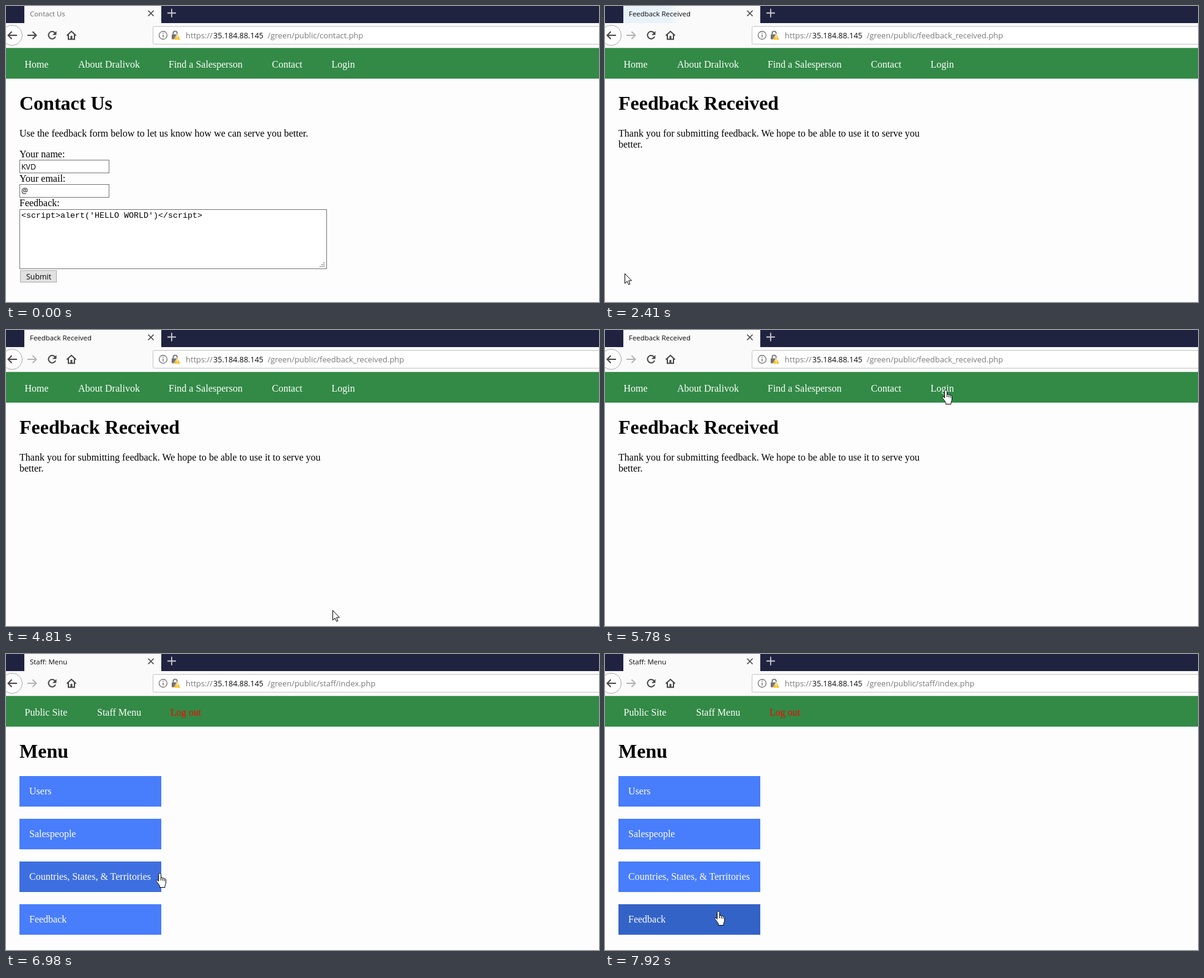
An HTML page for the animation above (8000 ms loop, 970 by 485 pixels).

```html
<!DOCTYPE html>
<html lang="en">
<head>
<meta charset="utf-8">
<title>Feedback form</title>
<style>
html, body { margin: 0; width: 100%; height: 100%; overflow: hidden; background: #fdfdfd; }
svg { display: block; }
text { white-space: pre; }
.serif { font: 16px "Liberation Serif", serif; }
.h1 { font: bold 32px "Liberation Serif", serif; }
.tab { font: 11.45px "Open Sans", sans-serif; }
.url { font: 12.9px "Open Sans", sans-serif; fill: #7b7b7b; }
.ip { font-size: 12.6px; fill: #0c0c0d; }
.ui { font: 12.4px "Open Sans", sans-serif; }
.mono { font: 13.333px "Liberation Mono", monospace; }
.nav { fill: #fff; }
.field { fill: #fff; stroke: #757575; }
.icon { fill: none; stroke: #47474a; stroke-width: 2; }
.item { fill: #487dfc; }

/* Every track is an 8 s loop of hard steps. */
.form, .thanks, .staff, .title, .fwd, .submit, .burst, .arrow, .hand, .places, .feedback {
  animation: 8s step-end infinite;
}
.form { animation-name: form; }
.thanks { animation-name: thanks; }
.staff { animation-name: staff; }
.title { animation-name: title; }
.fwd { animation-name: fwd; }
.submit { animation-name: submit; }
.burst { animation-name: burst; transform-origin: 30px 0; }
.arrow { animation-name: arrow; }
.hand { animation-name: hand; }
.places { animation-name: places; }
.feedback { animation-name: feedback; }

@keyframes form { 0% { visibility: visible } 30.125%, 100% { visibility: hidden } }
@keyframes thanks { 0% { visibility: hidden } 30.125% { visibility: visible } 75.625%, 100% { visibility: hidden } }
@keyframes staff { 0% { visibility: hidden } 75.625%, 100% { visibility: visible } }
@keyframes title { 0% { fill: #6c6c6e } 28.25%, 100% { fill: #0c0c0d } }
@keyframes fwd { 0% { stroke: #47474a } 30.125%, 100% { stroke: #b3b3b4 } }
@keyframes submit {
  0% { fill: #e1e1e1; stroke: #adadad }
  26.625% { fill: #e5f1fb; stroke: #0078d7 }
  28.25%, 100% { fill: #cce4f7; stroke: #005499 }
}
@keyframes burst {
  0% { opacity: 0; transform: scaleX(0) }
  30.125% { opacity: 1; transform: scaleX(.4) }
  31.75% { opacity: 1; transform: scaleX(.8) }
  33.5% { opacity: .8; transform: none }
  35% { opacity: 0; transform: none }
  75.625% { opacity: 1; transform: scaleX(.4) }
  77.125% { opacity: 1; transform: scaleX(.8) }
  78.625% { opacity: 1; transform: none }
  80.625%, 100% { opacity: 0; transform: none }
}
@keyframes arrow {
  0%, 12%, 41.875%, 48.25%, 68.75%, 87.25%, 95.25%, 100% { transform: translate(-40px, 0) }
  10.125% { transform: translate(464px, 480px) }
  21.375% { transform: translate(72px, 469px) }
  23.25% { transform: translate(45px, 448px) }
  24.875% { transform: translate(32px, 438px) }
  31.75% { transform: translate(36px, 440px) }
  33.5% { transform: translate(41px, 443px) }
  35% { transform: translate(45px, 445px) }
  36.875% { transform: translate(60px, 450px) }
  38.375% { transform: translate(88px, 462px) }
  39.875% { transform: translate(111px, 474px) }
  43.625% { transform: translate(743px, 479px) }
  45.125% { transform: translate(800px, 475px) }
  46.75% { transform: translate(855px, 478px) }
  60.125% { transform: translate(534px, 459px) }
  61.625% { transform: translate(521px, 449px) }
  63.5% { transform: translate(520px, 320px) }
  65.125% { transform: translate(582px, 143px) }
  66.875% { transform: translate(514px, 84px) }
  75.625% { transform: translate(556px, 98px) }
  77.125% { transform: translate(552px, 102px) }
  78.625% { transform: translate(548px, 106px) }
  80.625% { transform: translate(541px, 109px) }
  82.375% { transform: translate(495px, 165px) }
  83.875% { transform: translate(370px, 300px) }
  85.375% { transform: translate(253px, 403px) }
  93.625% { transform: translate(200px, 396px) }
}
@keyframes hand {
  0%, 75.625%, 93.625% { transform: translate(-40px, 0) }
  68.75% { transform: translate(552px, 100px) }
  72.25% { transform: translate(551px, 98px) }
  87.25% { transform: translate(245px, 359px) }
  90.25% { transform: translate(242px, 360px) }
  92.125% { transform: translate(224px, 374px) }
  95.25% { transform: translate(180px, 418px) }
  97.125%, 100% { transform: translate(179px, 421px) }
}
@keyframes places {
  0% { fill: #487dfc }
  87.25% { fill: #3e6fe0 }
  88.75% { fill: #3868d2 }
  90.25% { fill: #3363c7 }
  93.625% { fill: #3e6fe0 }
  95.25%, 100% { fill: #487dfc }
}
@keyframes feedback {
  0% { fill: #487dfc }
  95.25% { fill: #4074e8 }
  99%, 100% { fill: #3363c7 }
}
</style>
</head>
<body>
<svg width="970" height="485" viewBox="0 0 970 485">
  <defs>
    <linearGradient id="glow">
      <stop offset="0" stop-color="#e8f2fb"/>
      <stop offset=".85" stop-color="#eaf3fb"/>
      <stop offset="1" stop-color="#fafbfc"/>
    </linearGradient>
  </defs>

  <!-- Browser frame -->
  <rect width="970" height="485" fill="#fdfdfd"/>
  <rect width="970" height="28" fill="#202340"/>
  <rect x="30" width="224" height="28" fill="#fafafb"/>
  <rect class="burst" x="30" width="224" height="28" fill="url(#glow)"/>
  <rect y="28" width="970" height="40" fill="#fafafb"/>
  <rect y="68" width="970" height="1" fill="#d5d5d7"/>
  <path d="M232.5 7.5l9 9m0-9l-9 9" class="icon" style="stroke-width:1.6"/>
  <path d="M264 11.5h14M271 4.5v14" fill="none" stroke="#c9cad2" stroke-width="1.8"/>

  <circle cx="10" cy="48" r="16.5" fill="#fdfdfd" stroke="#a9a9ab"/>
  <path class="icon" d="M18 48H4M9.500 42l-6 6 6 6"/>
  <path class="icon fwd" d="M35 48h14M43.500 42l6 6-6 6"/>
  <path class="icon" d="M80.500 44.500a6 6 0 1 0 .6 5.500"/>
  <path d="M82.500 41v6.500H76z" fill="#47474a"/>
  <path class="icon" d="M99.500 48.500l7.500-7 7.500 7M102 47v7.500h10V47"/>
  <path d="M105.500 49h3v5h-3z" fill="#47474a"/>

  <rect x="240.500" y="33.500" width="740" height="29" rx="2" fill="#fff" stroke="#c4c4c6"/>
  <circle cx="257" cy="48" r="6.500" fill="none" stroke="#737375" stroke-width="1.300"/>
  <path d="M257 47v4.500M257 44v1.600" stroke="#737375" stroke-width="1.500"/>
  <path d="M273.500 47v-2.500a3.200 3.200 0 0 1 6.400 0V47" fill="none" stroke="#737375" stroke-width="1.800"/>
  <rect x="271" y="46.500" width="10" height="8" rx="1" fill="#737375"/>
  <path d="M280 45.500l5.500 10h-11z" fill="#fdbe12" stroke="#fff" stroke-width=".6"/>
  <path d="M280 48.500v3.500M280 53v1.300" stroke="#fff" stroke-width="1.300"/>
  <text class="url" y="53"><tspan x="294">https://</tspan><tspan class="ip" x="339">35.184.88.145</tspan></text>
  <rect y="69" width="970" height="50" fill="#328a46"/>

  <!-- Public navigation, shared by two pages -->
  <g id="nav" class="staffless"></g>

  <g class="form">
    <text class="tab title" x="39" y="17">Contact Us</text>
    <text class="url" x="428" y="53">/green/public/contact.php</text>
    <g class="serif nav" id="public">
      <text x="30.500" y="101">Home</text>
      <text x="118" y="101">About Dralivok</text>
      <text x="266" y="101">Find a Salesperson</text>
      <text x="435" y="101">Contact</text>
      <text x="532.500" y="101">Login</text>
    </g>
    <text class="h1" x="22" y="170">Contact Us</text>
    <g class="serif">
      <text x="22" y="214">Use the feedback form below to let us know how we can serve you better.</text>
      <text x="22" y="248">Your name:</text>
      <text x="22" y="288">Your email:</text>
      <text x="22" y="328">Feedback:</text>
    </g>
    <rect class="field" x="22.500" y="252.500" width="146" height="21"/>
    <rect class="field" x="22.500" y="292.500" width="146" height="21"/>
    <rect class="field" x="22.500" y="333.500" width="502" height="97"/>
    <g class="ui">
      <text x="25" y="268">KVD</text>
      <text x="25" y="307">@</text>
    </g>
    <text class="mono" x="25" y="347">&lt;script&gt;alert('HELLO WORLD')&lt;/script&gt;</text>
    <path d="M519 421h2M516 424h5M513 427h8" stroke="#a0a0a0" stroke-width="2" stroke-dasharray="2 1"/>
    <rect class="submit" x="23.500" y="433.500" width="59" height="19"/>
    <text class="ui" x="33" y="448">Submit</text>
  </g>

  <g class="thanks">
    <text class="tab" x="39" y="17" fill="#0c0c0d">Feedback Received</text>
    <text class="url" x="428" y="53">/green/public/feedback_received.php</text>
    <use href="#public"/>
    <text class="h1" x="22" y="170">Feedback Received</text>
    <text class="serif" y="214">
      <tspan x="22">Thank you for submitting feedback. We hope to be able to use it to serve you</tspan>
      <tspan x="22" y="232">better.</tspan>
    </text>
  </g>

  <g class="staff">
    <text class="tab" x="39" y="17" fill="#0c0c0d">Staff: Menu</text>
    <text class="url" x="428" y="53">/green/public/staff/index.php</text>
    <g class="serif nav">
      <text x="30.500" y="101">Public Site</text>
      <text x="149" y="101">Staff Menu</text>
      <text x="269" y="101" fill="#f00">Log out</text>
    </g>
    <text class="h1" x="22" y="170">Menu</text>
    <rect class="item" x="22" y="200" width="232" height="50"/>
    <rect class="item" x="22" y="270" width="232" height="50"/>
    <rect class="item places" x="22" y="340" width="232" height="50"/>
    <rect class="item feedback" x="22" y="410" width="232" height="50"/>
    <g class="serif nav">
      <text x="38" y="230">Users</text>
      <text x="38" y="300">Salespeople</text>
      <text x="38" y="370">Countries, States, &amp; Territories</text>
      <text x="38" y="440">Feedback</text>
    </g>
  </g>

  <!-- Pointers -->
  <g fill="#fff" stroke="#000" stroke-linejoin="round">
    <path class="arrow" d="M.5 .5V16.500L4.200 13 6.600 18.500 9 17.500 6.700 12H11.500z"/>
    <path class="hand" d="M6.500 .5c1.200 0 2 .9 2 2V8c.6-1.200 2.600-.9 2.900.6.800-1 2.400-.6 2.700.8 1-.7 2.400 0 2.400 1.400V16c0 2.200-1.500 3.500-1.500 5.500v2H6.500v-2c0-1.500-2-3-3-5L.8 13.200c-.8-1.500 1-2.700 2.200-1.500l1.500 1.600V2.500c0-1.100.8-2 2-2zM8.500 8v4M11.400 9v3.500M14.100 10v3"/>
  </g>
</svg>
<script>
// The shared navigation must outlive the form page that declares it.
document.getElementById("nav").remove();
const shared = document.getElementById("public");
const defs = document.querySelector("defs");
shared.replaceWith(Object.assign(document.createElementNS("http://www.w3.org/2000/svg", "use")));
document.querySelector(".form use").setAttribute("href", "#public");
defs.append(shared);
</script>
</body>
</html>
```
